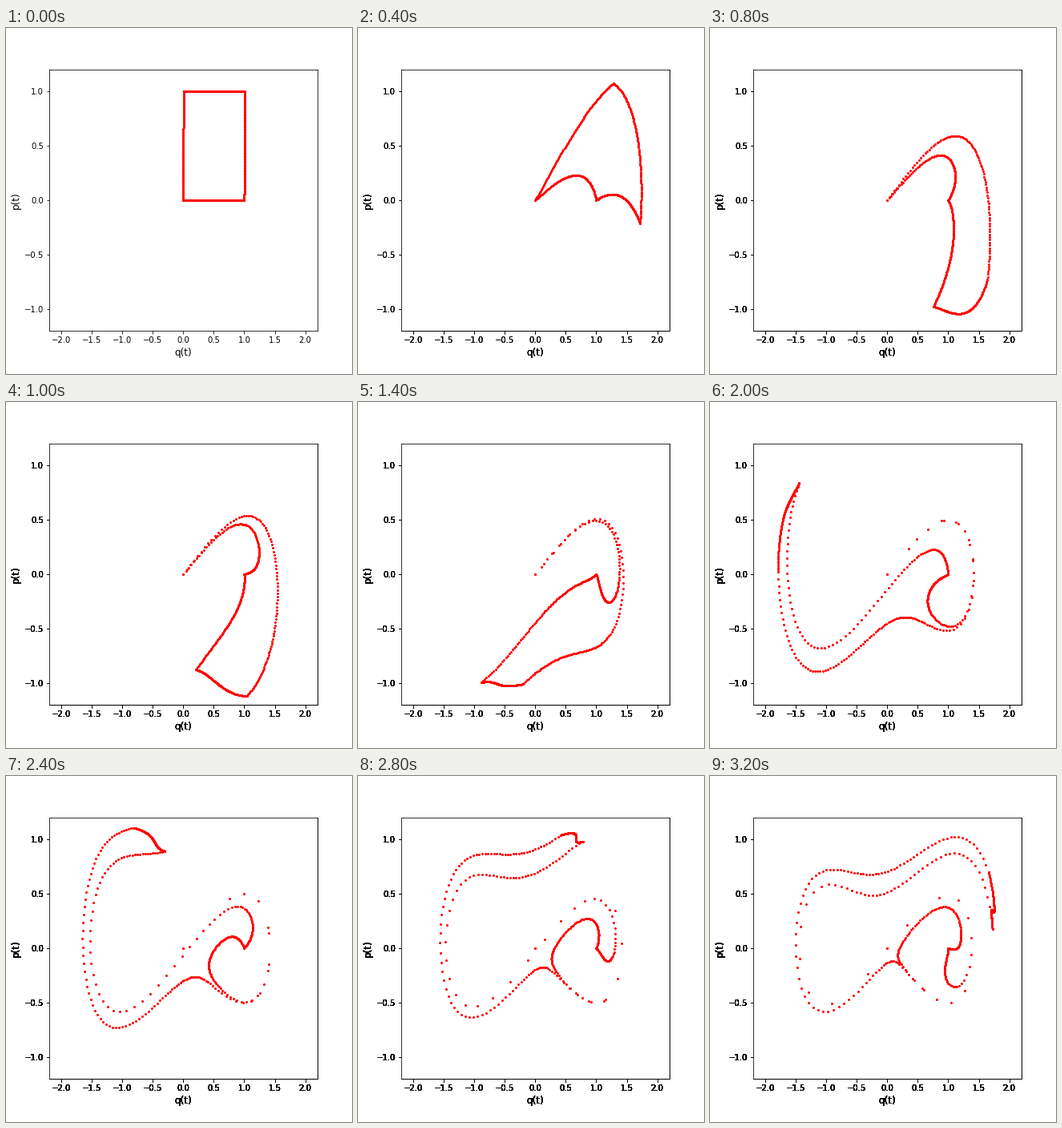
Animation of 432 by 432 pixels, one loop 3.4 s. Source, as a matplotlib script:

```python
import numpy as np
import matplotlib.pyplot as plt
from matplotlib.animation import FuncAnimation

FRAMES, INTERVAL = 17, 200
DT, STEPS = 0.001, 300  # integration step and steps per frame


def unit_square_border(n=100):
    s = np.linspace(0, 1, n)
    zero, one = np.zeros(n), np.ones(n)
    return np.concatenate([s, s, zero, one]), np.concatenate([zero, one, s, s])


def force(q):
    return -q * (q**2 - 1)


def advance(q, p, steps):
    """Leapfrog for H = p^2 + (q^2 - 1)^2 / 4."""
    for _ in range(steps):
        p = p + force(q) * DT / 2
        q = q + 2 * p * DT
        p = p + force(q) * DT / 2
    return q, p


def add_axes(fig, q, p):
    ax = fig.add_axes([0.125, 0.11, 0.775, 0.755])
    ax.plot(q, p, "ro", markersize=2)
    ax.set(xlim=(-2.2, 2.2), ylim=(-1.2, 1.2))
    ax.set_xlabel("q(t)", fontsize=12)
    ax.set_ylabel("p(t)", fontsize=12)
    return ax


plt.rcParams.update({"font.family": "DejaVu Sans", "font.size": 10})
fig = plt.figure(figsize=(6, 6), dpi=72, facecolor="white")
fig.subplots_adjust(0.125, 0.125, 0.9, 0.88)

state = advance(*unit_square_border(), 1)
layers = []
for _ in range(FRAMES):
    ax = add_axes(fig, *state)
    ax.set_position([0.125, 0.125, 0.775, 0.755])
    layers.append(ax)
    state = advance(*state, STEPS)


def update(k):
    # Opaque panels pile up, so the labels around them darken with time.
    for i, ax in enumerate(layers):
        ax.set_visible(i <= k)
    return layers


anim = FuncAnimation(fig, update, frames=FRAMES, interval=INTERVAL,
                     repeat=True, repeat_delay=0, blit=False)
plt.show()
```
